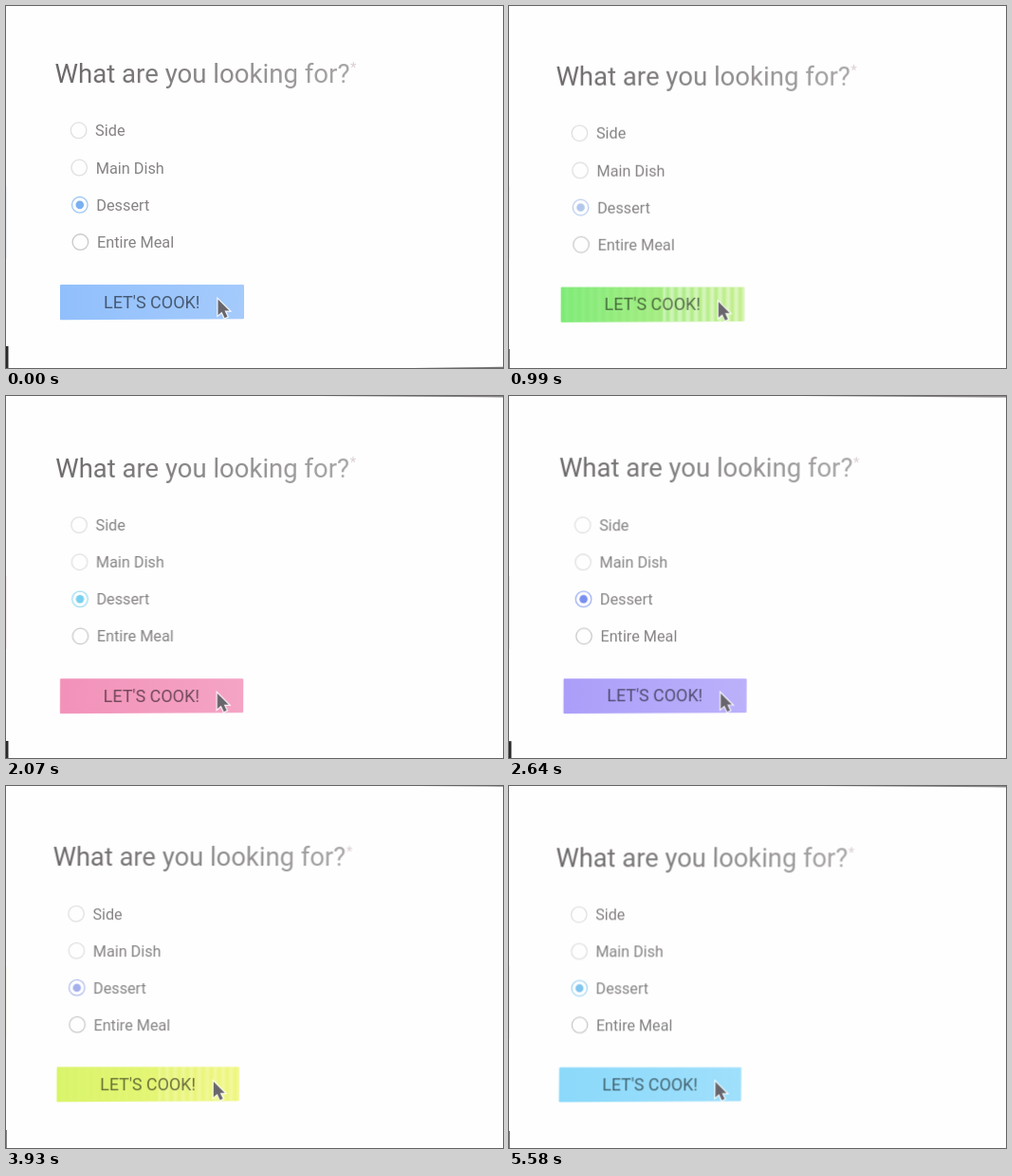
An HTML page that plays this animation: 524 by 382 pixels, repeating every 5610 ms.

```html
<!DOCTYPE html>
<html lang="en">
<head>
<meta charset="utf-8">
<title>Recipe form</title>
<style>
  html, body { margin: 0; width: 100%; height: 100%; overflow: hidden; background: #fefefe; }
  svg { display: block; width: 524px; height: 382px; font-family: Roboto, Arial, sans-serif; }
  #page { filter: blur(.6px); }
</style>
</head>
<body>
<svg viewBox="0 0 524 382">
  <defs>
    <linearGradient id="ink" gradientUnits="userSpaceOnUse" x1="52" x2="362" y1="0" y2="0">
      <stop stop-color="#6b6769"/><stop offset="1" stop-color="#a9a6a7"/>
    </linearGradient>
    <linearGradient id="paint" gradientUnits="userSpaceOnUse" x1="57" x2="251" y1="0" y2="0">
      <stop id="near"/><stop id="far" offset="1"/>
    </linearGradient>
    <linearGradient id="bands" gradientUnits="userSpaceOnUse" x1="0" x2="8.5" y1="0" y2="0" spreadMethod="repeat">
      <stop stop-color="#fff" stop-opacity="0"/><stop offset=".5" stop-color="#fff"/>
      <stop offset="1" stop-color="#fff" stop-opacity="0"/>
    </linearGradient>
  </defs>
  <g id="page">
    <text x="51.5" y="80.5" font-size="27.6" fill="url(#ink)">What are you looking for?</text>
    <text x="363" y="70" font-size="15" fill="#dccfd2">*</text>
    <g id="options" font-size="16.3" fill="#868284"></g>
    <path d="M58 294H250V328L58 329Z" fill="url(#paint)" stroke="url(#paint)" stroke-width="2" stroke-linejoin="round"/>
    <g id="moire" fill="url(#bands)">
      <path d="M57 293H251V329H57Z" opacity=".2"/>
      <path d="M165 293H251V329H165Z"/>
    </g>
    <text x="103" y="317.5" font-size="18" opacity=".54">LET'S COOK!</text>
    <path d="M223.5 308.5V325L227.5 321.5L230.5 328L233.5 326.5L230.5 320.5H235.5Z" fill="#68666c" stroke="#fff" stroke-opacity=".85" stroke-width="2.4" paint-order="stroke"/>
  </g>
  <path id="topEdge" fill="#8c8889"/>
  <path id="bottomEdge" fill="#777"/>
  <rect id="corner" fill="#2c292b" height="30"/>
  <rect id="glow" y="190" width="1" height="77" opacity=".15"/>
</svg>
<script>
const LOOP = 5610;
const $ = id => document.getElementById(id);

// time, button hue, camera x, camera y
const path = [
  [0, 214, 52, 71],
  [990, 116, 50, 74],
  [1500, 62, 52, 75.8],
  [2640, -112, 53.5, 76.2],
  [3930, -288, 50, 75],
  [4890, -397, 50, 75],
  [5580, -522, 50, 76]
];

$("options").innerHTML = ["Side", "Main Dish", "Dessert", "Entire Meal"].map((label, i) => {
  const x = 76.6 + i * .6, y = 131 + i * 39.1, on = label === "Dessert";
  return `<circle cx="${x}" cy="${y}" r="8.3" fill="none" stroke="${i === 3 ? "#cbc8c9" : "#e2dfe0"}" stroke-width="1.3" ${on ? 'id="ring"' : ""}/>` +
    (on ? `<circle cx="${x}" cy="${y}" r="4.3" id="dot"/>` : "") +
    `<text x="${x + 17.5}" y="${y + 6}">${label}</text>`;
}).join("");

// Each group of four steps lasts 150 ms, its first step being 60 ms.
function hold(t) {
  const base = t < 3030 ? 0 : 3030, m = (t - base) % 150;
  return t - m + (m < 60 ? 0 : Math.floor(m / 30) * 30);
}

function sample(t) {
  const i = Math.max(1, path.findIndex(p => p[0] > t));
  const n = t >= path.at(-1)[0] ? path.length - 1 : i;
  const a = path[n - 1], b = path[n];
  const k = Math.min(1, (t - a[0]) / (b[0] - a[0]));
  return a.map((v, j) => v + (b[j] - v) * k);
}

const cosDeg = angle => Math.cos(angle * Math.PI / 180);

function set(id, attrs) {
  for (const name in attrs) $(id).setAttribute(name, attrs[name]);
}

function drawPage(t, x, y) {
  // The page shrinks and leans slightly as the camera drifts.
  const s = t / 1000, sx = 1 - .0018 * s, sy = (223 - .4 * s) / 222;
  const skew = (5 - .36 * s - 5 * sx) / 222;
  set("page", { transform: `matrix(${sx} 0 ${skew} ${sy} ${x - 52 * sx - 71 * skew} ${y - 71 * sy})` });
}

function drawColors(hue) {
  const green = Math.max(0, cosDeg(hue - 115));
  const sat = 84 - 10 * cosDeg(2 * (hue - 125));
  const light = 74 + 6 * cosDeg(hue - 265);
  set("near", { "stop-color": `hsl(${hue} ${sat}% ${light}%)` });
  set("far", { "stop-color": `hsl(${hue - 30 * green ** 4} ${sat}% ${light + 4}%)` });
  set("moire", { opacity: .5 * green ** 2 });

  // The selected option pales while the button shines brightly.
  const tint = 212 + 18 * cosDeg(2 * (hue - 259)), radioSat = 80 - 20 * green;
  set("ring", { stroke: `hsl(${tint} ${radioSat}% ${79 + 3 * green}%)` });
  set("dot", { fill: `hsl(${tint} ${radioSat}% ${71 + 10 * green}%)` });
  set("glow", { fill: `hsl(${hue} 50% 72%)` });
}

function drawEdges(t, x, y) {
  const top = Math.min(524, 540 - 105 * (y - 74)), low = Math.min(524, 430 + t * .5);
  set("topEdge", { d: `M${top} 0H524V${(524 - top) / 140}Z` });
  set("bottomEdge", { d: `M${low} 382L524 ${382 - (524 - low) / 75}V382Z` });
  set("corner", { y: y + 288, width: Math.min(2.5, x - 49.4) });
}

function draw(now) {
  const t = hold(now % LOOP);
  const [, hue, x, y] = sample(t);
  drawPage(t, x, y);
  drawColors(hue);
  drawEdges(t, x, y);
}

const begin = performance.now();
function tick() {
  draw(performance.now() - begin);
  requestAnimationFrame(tick);
}
tick();
</script>
</body>
</html>
```
